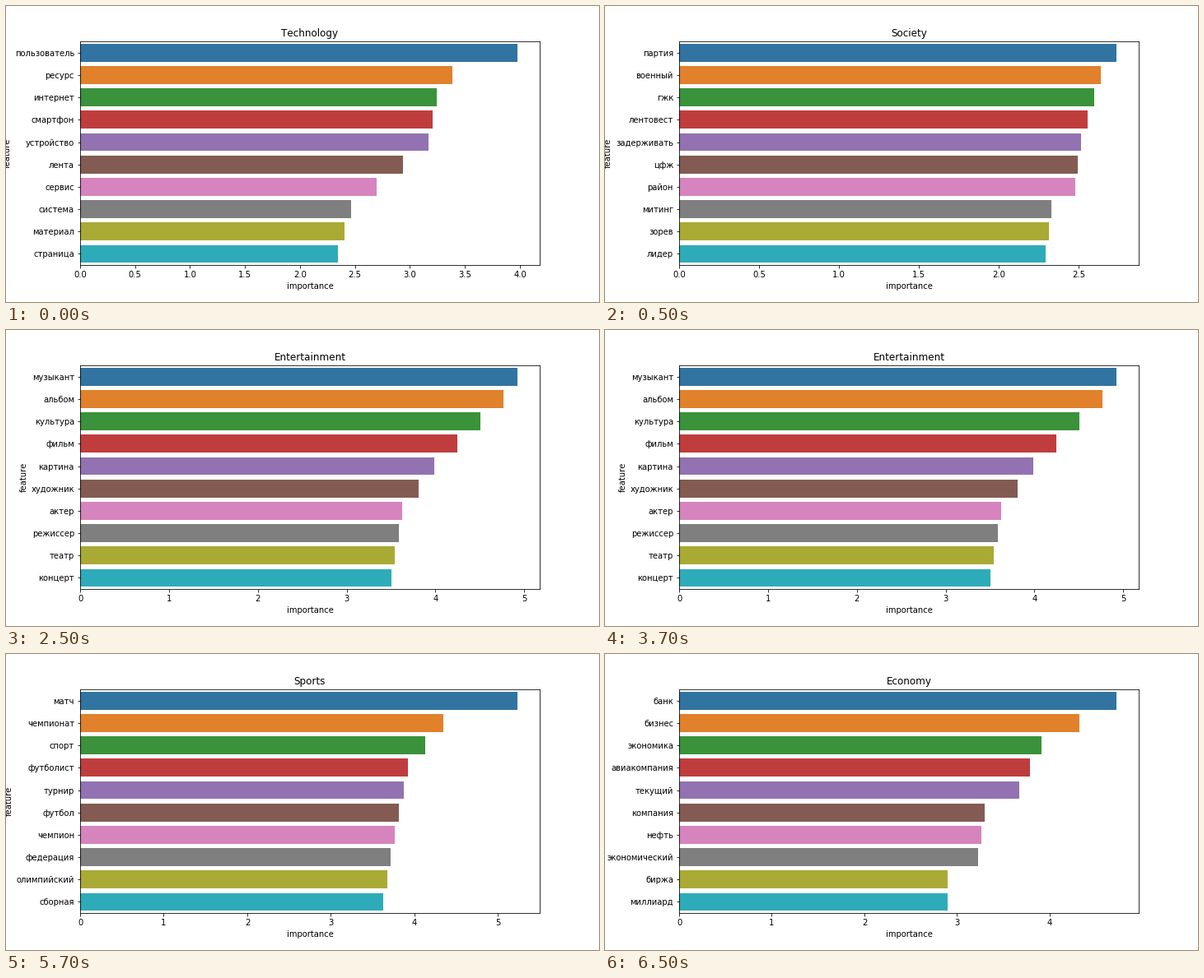
A matplotlib script for the animation above (8000 ms loop, 720 by 360 pixels).

```python
import matplotlib.pyplot as plt
import numpy as np
from matplotlib.animation import FuncAnimation

plt.rcParams["font.family"] = "DejaVu Sans"
plt.rcParams["font.size"] = 10
plt.rcParams["text.kerning_factor"] = 6

COLORS = ["#3274a1", "#e1812c", "#3a923a", "#c03d3e", "#9372b2",
          "#845b53", "#d684bd", "#7f7f7f", "#a9aa35", "#2eabb8"]

# title, feature words, importance at a few ranks (linear in between)
TOPICS = [
    ("Technology",
     "пользователь ресурс интернет смартфон устройство "
     "лента сервис система материал страница",
     {0: 3.981, 1: 3.386, 2: 3.243, 4: 3.168, 7: 2.464, 9: 2.345}),
    ("Society",
     "партия военный гжк лентовест задерживать "
     "цфж район митинг зорев лидер",
     {0: 2.738, 1: 2.638, 4: 2.514, 6: 2.478, 7: 2.329, 9: 2.293}),
    ("Entertainment",
     "музыкант альбом культура фильм картина "
     "художник актер режиссер театр концерт",
     {0: 4.927, 1: 4.765, 4: 3.987, 6: 3.625, 9: 3.505}),
    ("Sports",
     "матч чемпионат спорт футболист турнир "
     "футбол чемпион федерация олимпийский сборная",
     {0: 5.236, 1: 4.345, 3: 3.921, 6: 3.764, 9: 3.626}),
    ("Economy",
     "банк бизнес экономика авиакомпания текущий "
     "компания нефть экономический биржа миллиард",
     {0: 4.724, 2: 3.911, 4: 3.671, 5: 3.298, 7: 3.227, 8: 2.898}),
]

STEP_MS = 500
FRAMES = 16
STEPS_PER_TOPIC = 4
FIRST_OFFSET = 3  # the loop starts with the last step of the first topic

fig = plt.figure(figsize=(10, 5), dpi=72, facecolor="white")
ax = fig.add_axes([0.125, 0.125, 0.775, 0.755])


def draw(frame):
    title, words, knots = TOPICS[(frame + FIRST_OFFSET) // STEPS_PER_TOPIC]
    labels = words.split()
    ranks = np.arange(len(labels))
    values = np.interp(ranks, list(knots), list(knots.values()))
    ax.clear()
    ax.barh(ranks, values, height=0.8, color=COLORS)
    ax.set_xlim(0, values[0] * 1.05)
    ax.set_ylim(len(labels) - 0.5, -0.5)
    ax.set_yticks(ranks, labels)
    ax.set_xlabel("importance")
    ax.set_ylabel("feature")
    ax.set_title(title, fontsize=12)
    return []


anim = FuncAnimation(fig, draw, frames=FRAMES, init_func=lambda: draw(0),
                     interval=STEP_MS, repeat=True, repeat_delay=0, blit=False)
plt.show()
```
